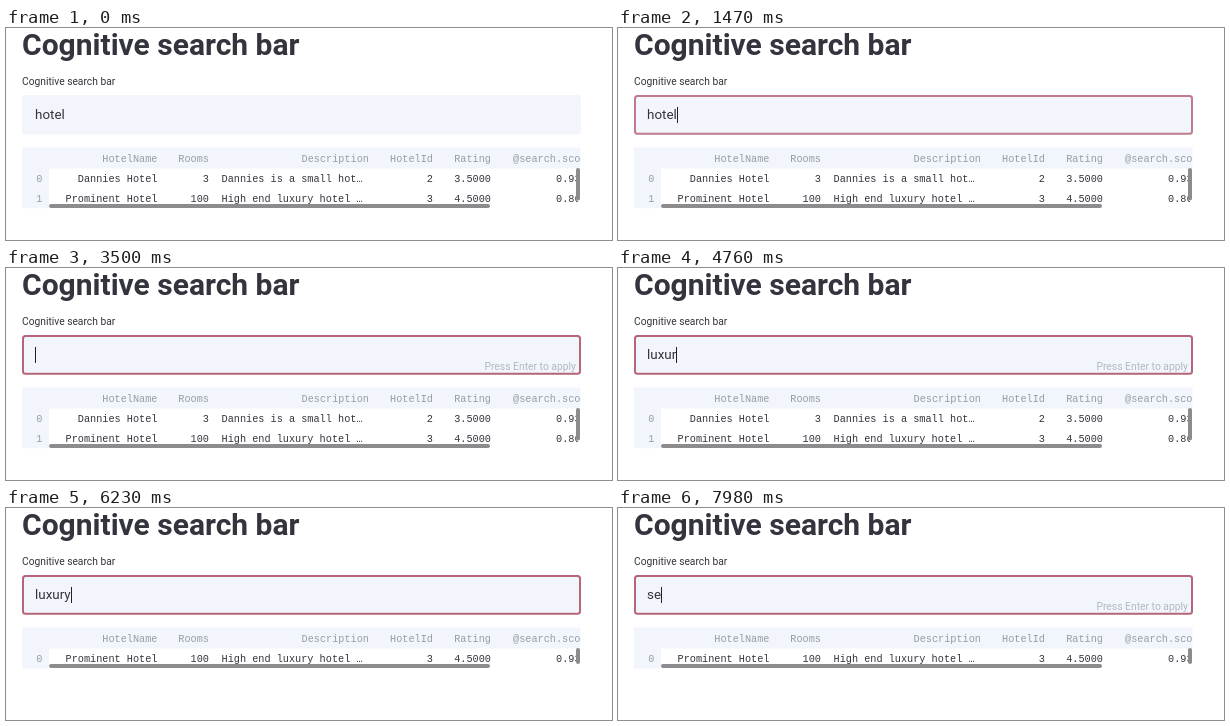
An HTML page that plays this animation: 606x212 px, repeating every 8 s.

```html
<!DOCTYPE html>
<html lang="en">
<head>
<meta charset="utf-8">
<title>Cognitive search bar</title>
<style>
  html, body { margin: 0; width: 100%; height: 100%; overflow: hidden; background: #fff; }
  svg { display: block; width: 606px; height: 212px; }
  text { font-family: Roboto, sans-serif; fill: #33343d; white-space: pre; }
  .title { font-size: 30px; font-weight: 700; }
  .label { font-size: 10.25px; }
  .query { font-size: 13.4px; }
  .hint { font-size: 10.35px; fill: #b3b6c0; }
  .table text { font-family: "Liberation Mono", monospace; font-size: 10.22px; }
  .table .muted { fill: #969ba8; }
  .end { text-anchor: end; }
  .panel { fill: #f2f6fc; }
  .thumb { fill: #8c8c8e; }
  #focus { fill: none; stroke: #b8647b; stroke-width: 2; }
</style>
</head>
<body>
<svg viewBox="0 0 606 212">
  <defs><clipPath id="tableClip"><rect x="16" y="119" width="558.5" height="61.5"/></clipPath></defs>
  <text class="title" x="16" y="27">Cognitive search bar</text>
  <text class="label" x="16" y="57">Cognitive search bar</text>

  <rect class="panel" x="16" y="67" width="559" height="39.5" rx="3"/>
  <rect id="focus" x="17" y="68" width="557" height="37.8" rx="2.5"/>
  <text class="query" id="query" x="29" y="91"></text>
  <rect id="caret" y="79" width="1" height="16" fill="#222"/>
  <text class="hint end" id="hint" x="570" y="102">Press Enter to apply</text>

  <g class="table" clip-path="url(#tableClip)">
    <g id="before"></g>
    <g id="after"></g>
  </g>
</svg>
<script>
const LOOP = 8000;
const $ = id => document.getElementById(id);

const columns = [
  { name: 'HotelName', right: 151.5 },
  { name: 'Rooms', right: 203 },
  { name: 'Description', right: 363, left: 215.5 },
  { name: 'HotelId', right: 427 },
  { name: 'Rating', right: 485 },
  { name: '@search.sco', right: 574.5, left: 550 }
];
const small = ['Dannies Hotel', '3', 'Dannies is a small hot…', '2', '3.5000', '0.93'];
const luxury = ['Prominent Hotel', '100', 'High end luxury hotel …', '3', '4.5000'];

const rect = (cls, x, y, w, h, rx = 0) =>
  `<rect class="${cls}" x="${x}" y="${y}" width="${w}" height="${h}" rx="${rx}"/>`;
const text = (cls, x, y, s) => `<text class="${cls}" x="${x}" y="${y}">${s}</text>`;

function drawTable(group, rows) {
  const bottom = 140.5 + rows.length * 20;
  let out = rect('panel', 16, 119.5, 559, 21) + rect('panel', 16, 140, 27, bottom - 140);
  columns.forEach(c => { out += text('muted end', c.right, 134, c.name); });
  rows.forEach((row, i) => {
    const y = 154 + i * 20;
    out += text('muted end', 36.5, y, i);
    row.forEach((cell, k) => {
      const { left, right } = columns[k];
      out += left ? text('', left, y, cell) : text('end', right, y, cell);
    });
  });
  // scrollbar tracks and thumbs
  out += `<path fill="#fff" d="M572 141h4V${bottom}H484v-4.5h88z"/>`;
  out += rect('thumb', 43, bottom - 4.5, 441, 4, 2);
  out += rect('thumb', 570, 140, 4, bottom - 148 + (rows.length < 2 ? 3.5 : 0), 2);
  group.innerHTML = out;
}
drawTable($('before'), [small, [...luxury, '0.86']]);
drawTable($('after'), [[...luxury, '0.93']]);

// [start ms, value]
const typed = [[0, 'hotel'], [2450, 'hote'], [3010, ''], [3640, 'l'], [3990, 'lu'], [4340, 'lux'],
  [4620, 'luxu'], [4760, 'luxur'], [5040, 'luxury'], [7280, ''], [7770, 's'], [7980, 'se']];
const caretOn = [[0, 0], [1330, 1], [1960, 0], [2450, 1], [2940, 0], [3500, 1], [5530, 0],
  [6090, 1], [6580, 0], [7140, 1], [7630, 0], [7770, 1]];
const hintOn = [[0, 0], [2450, 1], [5670, 0], [7280, 1]];
const focusLevel = [[0, 0], [1330, .3], [1400, .6], [1470, .85], [1540, 1]];

const at = (steps, t) => steps.findLast(([start]) => start <= t)[1];
const show = (id, opacity) => $(id).setAttribute('opacity', opacity);

let current = null;
function draw(t) {
  const value = at(typed, t);
  if (value !== current) {
    $('query').textContent = current = value;
  }
  const width = value ? $('query').getComputedTextLength() : 0;
  $('caret').setAttribute('x', Math.round(29 + width));
  show('caret', at(caretOn, t));
  show('hint', at(hintOn, t));
  show('focus', at(focusLevel, t));
  show('before', t < 6230 ? 1 : 0);
  show('after', t < 6230 ? 0 : 1);
}

const began = performance.now();
function tick() {
  draw((performance.now() - began) % LOOP);
  requestAnimationFrame(tick);
}
tick();
</script>
</body>
</html>
```
